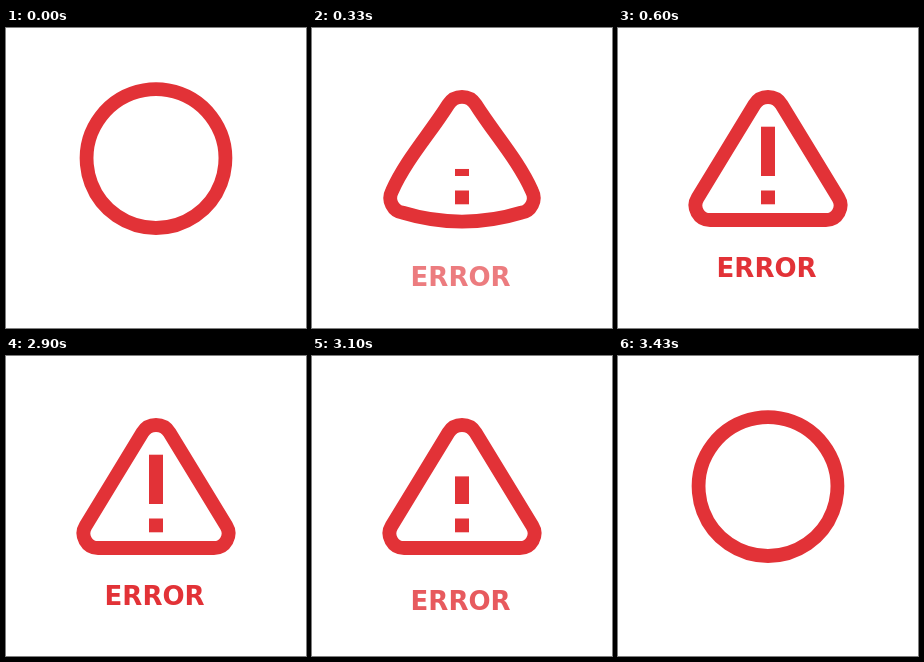
Recreate the animation shown at these times as an HTML page. Size 300x300 px, loop 3470 ms.

```html
<!DOCTYPE html>
<html lang="en">
<head>
<meta charset="utf-8">
<title>Error</title>
<style>
  html, body { margin: 0; width: 100%; height: 100%; overflow: hidden; background: #fff; }
  svg { display: block; width: 100%; height: 100%; }
  text { font: bold 26px "DejaVu Sans", sans-serif; }
</style>
</head>
<body>
<svg viewBox="0 0 300 300" fill="#e23237">
  <path id="ring" fill="none" stroke="#e23237" stroke-width="13.8"/>
  <path id="cross" fill="none" stroke="#e23237" stroke-width="14" d="M128 110L174 156M174 110L128 156"/>
  <rect id="bar" x="143" width="14"/>
  <rect id="dot" x="143" width="14"/>
  <text id="label" x="98.6" y="248.8">ERROR</text>
</svg>
<script>
const LOOP = 3470, FPS = 30, CX = 150;
const [ring, cross, bar, dot, label] =
  ['ring', 'cross', 'bar', 'dot', 'label'].map(id => document.getElementById(id));

const clamp = (v, lo = 0, hi = 1) => Math.min(hi, Math.max(lo, v));
const smooth = p => p * p * (3 - 2 * p);
const outPow = (p, n) => 1 - (1 - p) ** n;
const mix = (a, b, p) => a.map((v, i) => v + (b[i] - v) * p);

// Cubic for an arc; degrees run anticlockwise from the top.
function arc(cx, cy, r, from, to) {
  const [a, b] = [from, to].map(d => d * Math.PI / 180);
  const h = 4 / 3 * Math.tan((b - a) / 4);
  const at = (t, k) => [
    cx - r * (Math.sin(t) + k * Math.cos(t)),
    cy - r * (Math.cos(t) - k * Math.sin(t))
  ];
  return [at(a, 0), at(a, h), at(b, -h), at(b, 0)];
}

// Left halves from top to bottom: a start point, then cubic triples.
const angles = [0, 10, 95, 111, 180];
const circle = angles.slice(1).flatMap((to, i) =>
  arc(CX, 130.6, 69.4, angles[i], to).slice(i ? 1 : 0));

const SLANT = 58.6;
const apex = arc(CX, 84.9, 15.9, 0, SLANT);
const corner = arc(92, 177.5, 14.5, SLANT, 180);
const bottom = [CX, 192];
const between = (a, b) => [mix(a, b, 1 / 3), mix(a, b, 2 / 3)];
const triangle = [
  ...apex, ...between(apex[3], corner[0]),
  ...corner, ...between(corner[3], bottom), bottom
];

// The upper part settles sooner than the base.
function outline(top, base) {
  const left = circle.map((p, i) => mix(p, triangle[i], i < 5 ? top : base));
  const right = left.slice(0, -1).reverse().map(([x, y]) => [2 * CX - x, y]);
  const text = [...left, ...right].map(q => q.map(v => v.toFixed(2)).join(' '));
  return `M${text[0]}C${text.slice(1).join(' ')}Z`;
}

function grow(rect, bottom, height) {
  rect.setAttribute('y', bottom - height);
  rect.setAttribute('height', height);
}

function draw(ms) {
  const t = Math.floor(ms % LOOP / 10) * 10;
  const n = Math.floor((t + 5) * FPS / 1000);
  // Steps into the warning pose; the way out mirrors the way in.
  const k = clamp(Math.min(n - 7, 97 - n), 0, 11);

  ring.setAttribute('d', outline(smooth(clamp((k - 1) / 2.2)), clamp((k - 1) / 2.5)));
  cross.setAttribute('visibility', k === 0 && n >= 2 && n < 103 ? 'visible' : 'hidden');
  grow(dot, 176.3, 13.8 * clamp(k / 2));
  grow(bar, 148, 49.3 * outPow(clamp((k - 2.75) / 8.25), 5));
  label.setAttribute('opacity', outPow(clamp((k - 1) / 10), 4.5));
  label.setAttribute('transform', `translate(0 ${34 * (1 - outPow(k / 11, 4))})`);
}

const start = performance.now();
function tick() {
  draw(performance.now() - start);
  requestAnimationFrame(tick);
}
draw(0);
requestAnimationFrame(tick);
</script>
</body>
</html>
```
